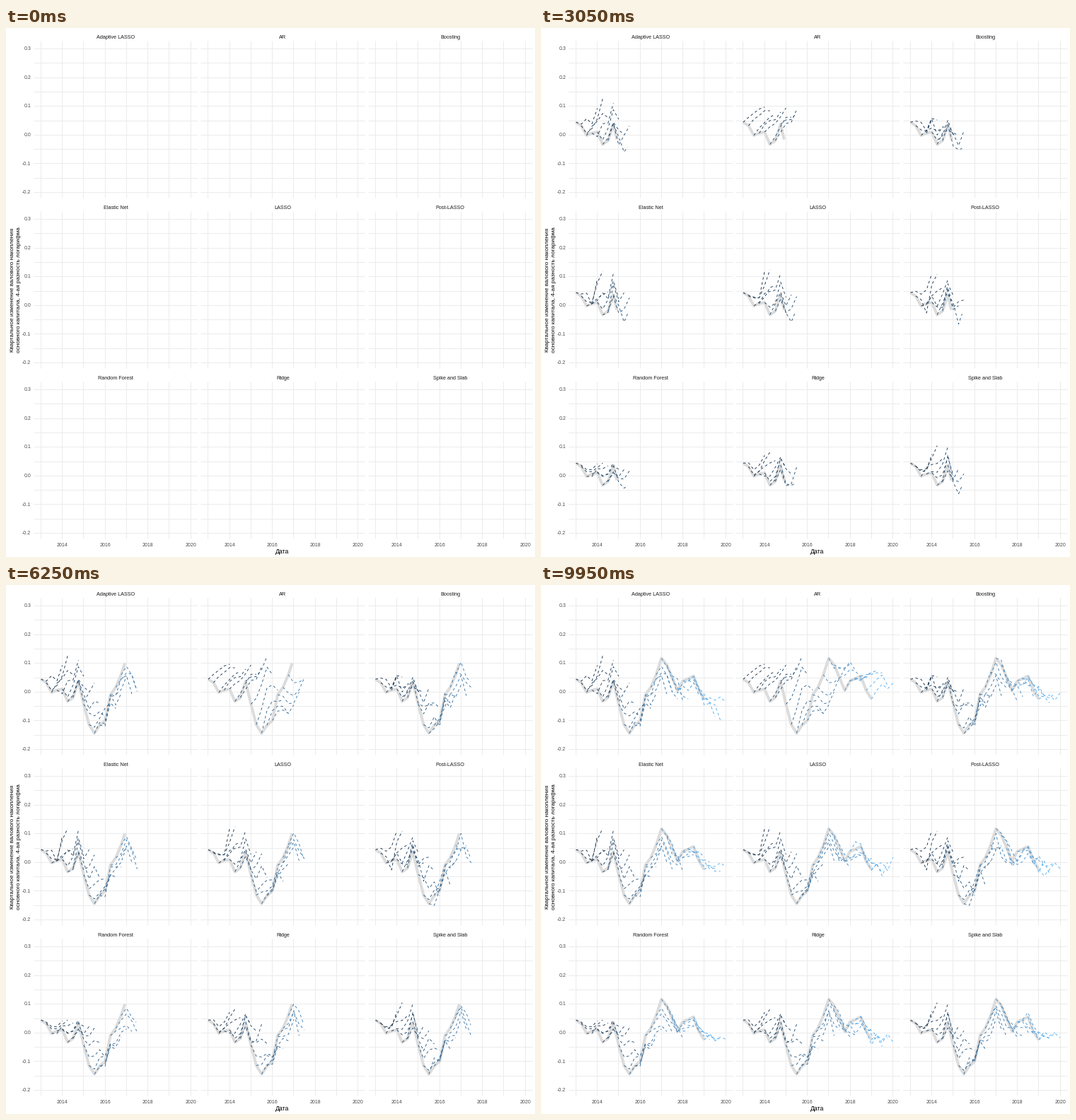
A matplotlib script for the animation above (10000 ms loop, 748 px wide and 748 px high).

```python
import matplotlib.pyplot as plt
import numpy as np
from matplotlib.animation import FuncAnimation
from matplotlib.collections import LineCollection

SIZE, DPI = 748, 72
FRAMES, INTERVAL = 200, 50
COL, ROW = 236.5, 241          # distance between panels
X0, QUARTER = 49.4, 7.56       # first quarter, one quarter in pixels
Y0, UNIT = 150.3, 406          # zero level, one unit in pixels
LAST, HORIZON = 24, 4          # last observed quarter, forecast length
DARK, LIGHT = np.array([19, 43, 67]) / 255, np.array([86, 177, 247]) / 255

plt.rcParams["font.family"] = "Liberation Sans"
rng = np.random.default_rng(4)

# Growth by quarter in thousandths; the last four are only expectations
growth = np.array([42, 30, -4, 4, 8, -35, -22, 35, -45, -116, -146, -118, -102,
                   -12, 14, 58, 115, 92, 48, 3, 36, 44, 53, 3, -27,
                   -12, 0, -5, -8])

# Key points (quarter, level) that year-ahead forecasts arrive at
SPARSE = [(2, 80), (3, 35), (4, 108), (5, 115), (6, 75), (7, 115), (8, 30),
          (10, 25), (11, -38), (12, -78), (13, -33), (14, -60), (15, -10),
          (16, 50), (17, 8), (19, 0), (20, -22), (22, 28), (24, 0),
          (26, -30), (28, -12)]
INERTIAL = [(4, 95), (6, 65), (8, 90), (9, 60), (11, 116), (13, 2), (15, -68),
            (16, -48), (18, 48), (20, 100), (22, 48), (24, 68), (26, 70),
            (27, 20), (28, 28)]


def forecast(start, keys=SPARSE, optimism=1.0, track=0.8, power=1.6,
             noise=12, tail=0):
    """Leave the observed level, drift from the true path to the goal."""
    h = np.arange(HORIZON + 1)
    date = start + h
    base = track * growth[date] + (1 - track) * growth[start]
    goal = np.interp(date, *zip(*keys))
    goal = np.where(goal > 0, optimism * goal, goal)
    goal = goal + tail * np.clip((date - 20) / 6, 0, 1)
    wobble = noise * rng.standard_normal(len(h)) * (h > 0)
    return base + (h / HORIZON) ** power * (goal - base) + wobble


panels = [
    ("Adaptive LASSO", dict(optimism=1.05, noise=14, tail=-55)),
    ("AR", dict(keys=INERTIAL, track=0, power=0.9, noise=3)),
    ("Boosting", dict(optimism=0.35, noise=15)),
    ("Elastic Net", dict()),
    ("LASSO", dict(optimism=0.95)),
    ("Post-LASSO", dict(noise=19)),
    ("Random Forest", dict(optimism=0.35, track=0.65, noise=7)),
    ("Ridge", dict(optimism=0.75, noise=11)),
    ("Spike and Slab", dict(optimism=0.8, noise=10)),
]


def path(start, values, col, row):
    """Pixel path of quarterly values from a starting quarter."""
    x = X0 + QUARTER * (start + np.arange(len(values))) + col * COL
    y = Y0 - UNIT * values / 1000 + row * ROW
    return np.column_stack([x, y])


def reveal(points, steps):
    """First part of a path, cut after a fractional number of steps."""
    whole = int(steps)
    if whole >= len(points) - 1:
        return points
    tip = points[whole] + (steps - whole) * (points[whole + 1] - points[whole])
    return np.vstack([points[:whole + 1], tip])


fig = plt.figure(figsize=(SIZE / DPI, SIZE / DPI), dpi=DPI, facecolor="white")
ax = fig.add_axes([0, 0, 1, 1])
ax.set(xlim=(0, SIZE), ylim=(SIZE, 0))
ax.axis("off")


def label(x, y, text, size, color, ha="center", **kw):
    ax.text(x, y, text, fontsize=size, color=color, ha=ha, va="baseline", **kw)


def pixel(v):
    return np.floor(v) + 0.5


grid, observed, forecasts = [], [], []
for i, (name, style) in enumerate(panels):
    row, col = divmod(i, 3)
    dx, dy = col * COL, row * ROW
    for year in range(8):
        x = pixel(X0 + 4 * QUARTER * year + dx)
        grid.append([(x, 18 + dy), (x, 240 + dy)])
    for k in range(-4, 7):
        y = pixel(Y0 - UNIT * k / 20 + dy)
        grid.append([(39 + dx, y), (271 + dx, y)])
    label(155 + dx, 14.6 + dy, name, 7.2, "#1a1a1a")
    observed.append(path(0, growth[:LAST + 1], col, row))
    for start in range(LAST + 1):
        color = DARK + start / LAST * (LIGHT - DARK)
        points = path(start, forecast(start, **style), col, row)
        forecasts.append((start, points, color))

for row in range(3):
    for k in range(-2, 4):
        label(35.3, Y0 - UNIT * k / 10 + row * ROW + 2.7, f"{k / 10:.1f}",
              7, "#4d4d4d", ha="right")
for col in range(3):
    for year in range(2014, 2021, 2):
        label(X0 + 4 * QUARTER * (year - 2013) + col * COL, 732.6, str(year),
              7, "#4d4d4d")

label(391, 743, "Дата", 8.8, "black")
for x, line in [(11.5, "Квартальное изменение валового накопления"),
                (20.5, "основного капитала, 4-ая разность логарифма")]:
    label(x, 370.5, line, 8.15, "black", rotation=90, rotation_mode="anchor")

ax.add_collection(LineCollection(grid, colors="#ebebeb", linewidths=1,
                                 zorder=1), autolim=False)
trend = LineCollection([], colors="#dcdcdc", linewidths=4, capstyle="butt",
                       joinstyle="round", zorder=2)
dashes = LineCollection([], linewidths=0.9, linestyles=[(0, (4, 4))],
                        capstyle="butt", zorder=3)
ax.add_collection(trend, autolim=False)
ax.add_collection(dashes, autolim=False)


def update(frame):
    now = (LAST + 1) * frame / (FRAMES - 1)
    trend.set_segments([reveal(p, now) for p in observed] if frame else [])
    # each forecast unrolls its four quarters within one quarter of time
    shown = [(reveal(p, HORIZON * (now - start)), color)
             for start, p, color in forecasts if now > start]
    dashes.set_segments([p for p, _ in shown])
    dashes.set_color([c for _, c in shown])
    return trend, dashes


anim = FuncAnimation(fig, update, frames=FRAMES, interval=INTERVAL,
                     init_func=lambda: update(0), repeat=True, repeat_delay=0)
plt.show()
```
